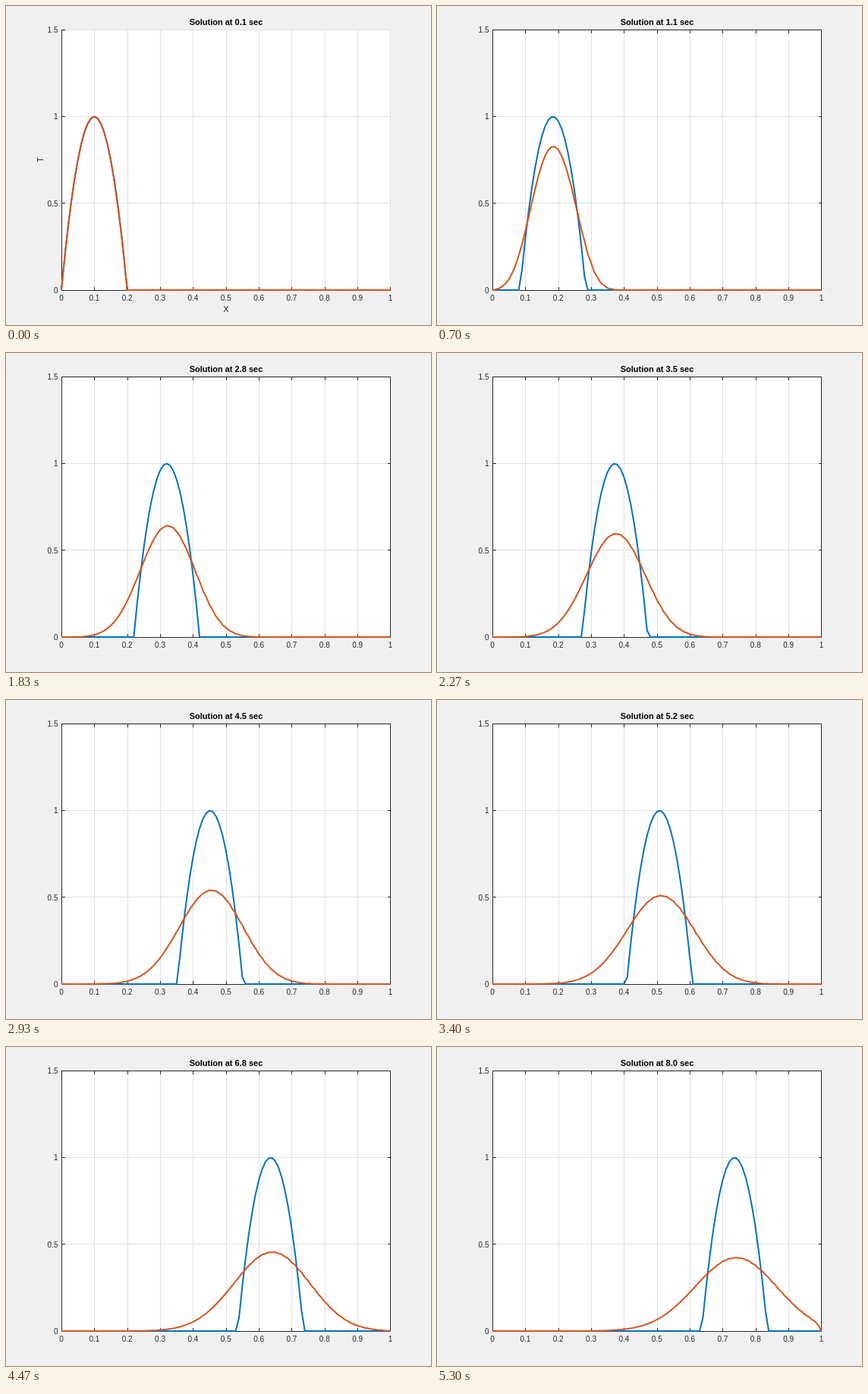
Recreate the animation shown at these times as an HTML page. Size 560 px wide and 420 px high, loop 5.33 s.

```html
<!DOCTYPE html>
<html lang="en">
<head>
<meta charset="utf-8">
<title>Advection of a pulse</title>
<style>
html, body { margin: 0; width: 100%; height: 100%; overflow: hidden; background: #f0f0f0; }
svg { display: block; }
text { font: 10px "Liberation Sans", Arial, sans-serif; fill: #262626; text-anchor: middle; }
.label { font-size: 11px; }
#title { font-size: 11px; font-weight: bold; fill: #000; }
.grid { stroke: #dfdfdf; }
.axis { stroke: #262626; }
.grid, .axis { fill: none; shape-rendering: crispEdges; }
.curve { fill: none; stroke-width: 2; stroke-linejoin: round; }
</style>
</head>
<body>
<svg width="560" height="420" viewBox="0 0 560 420">
  <rect x="73" y="31" width="434" height="343" fill="#fff"/>
  <path id="grid" class="grid"/>
  <path id="near" class="axis"/>
  <path id="far" class="axis"/>
  <g id="ticks"></g>
  <text id="title" x="290" y="25"></text>
  <g id="labels">
    <text class="label" x="290" y="403">X</text>
    <text class="label" transform="translate(49 202.5) rotate(-90)">T</text>
  </g>
  <path id="exact" class="curve" stroke="#0072bd"/>
  <path id="numeric" class="curve" stroke="#d95319"/>
</svg>
<script>
const CELLS = 100, STEPS = 160, LOOP = 5330;
const COURANT = 0.4, SHIFT = 0.004, TICK = 4;
const LEFT = 73.5, RIGHT = 506.5, TOP = 31.5, BOTTOM = 374;
const $ = id => document.getElementById(id);
const px = x => 73 + 433.5 * x;
const py = y => 374 - 228.4 * y;
const crisp = v => Math.round(v) + 0.5;

function buildAxes() {
  let grid = '', ticks = '';
  let near = `M${LEFT} 31V374.5H507`;
  let far = `M73 ${TOP}H${RIGHT}V374`;
  for (let i = 0; i <= 10; i++) {
    const x = Math.min(crisp(px(i / 10)), RIGHT);
    grid += `M${x} 31V374`;
    near += `M${x} ${BOTTOM}v${-TICK}`;
    far += `M${x} ${TOP}v${TICK}`;
    ticks += `<text x="${px(i / 10)}" y="388">${i / 10}</text>`;
  }
  for (let i = 0; i <= 3; i++) {
    const y = Math.max(Math.floor(py(i / 2)) + 0.5, TOP);
    grid += `M73 ${y}H507`;
    near += `M${LEFT} ${y}h${TICK}`;
    far += `M${RIGHT} ${y}h${-TICK}`;
    ticks += `<text x="68.5" y="${py(i / 2) + 3.7}" style="text-anchor:end">${i / 2}</text>`;
  }
  $('grid').setAttribute('d', grid);
  $('near').setAttribute('d', near);
  $('far').setAttribute('d', far);
  $('ticks').innerHTML = ticks;
}

// Parabolic pulse carried along without loss
const pulse = step => Array.from({ length: CELLS + 1 }, (_, i) =>
  Math.max(0, 1 - (10 * (i / CELLS - 0.1 - SHIFT * step)) ** 2));

// Lax-Friedrichs step with both ends held at zero
const advance = u => u.map((_, i) => i % CELLS === 0 ? 0 :
  (1 + COURANT) / 2 * u[i - 1] + (1 - COURANT) / 2 * u[i + 1]);

const solution = [pulse(0)];
while (solution.length < STEPS) solution.push(advance(solution.at(-1)));

const line = u => 'M' + u.map((v, i) =>
  px(i / CELLS).toFixed(2) + ' ' + py(v).toFixed(2)).join('L');

let shown = -1;
function draw(now) {
  // Steps last a thirtieth of a second, on a 10 ms clock
  const clock = Math.floor((now % LOOP) / 10) * 10;
  const step = Math.min(STEPS - 1, Math.floor((clock + 5) * 0.03));
  if (step !== shown) {
    shown = step;
    const seconds = Math.round((step + 1) / 2) / 10;
    $('title').textContent = `Solution at ${seconds.toFixed(1)} sec`;
    $('exact').setAttribute('d', line(pulse(step)));
    $('numeric').setAttribute('d', line(solution[step]));
    $('labels').style.display = step ? 'none' : '';
    $('far').style.display = step ? '' : 'none';
  }
  requestAnimationFrame(draw);
}

buildAxes();
draw(0);
</script>
</body>
</html>
```
